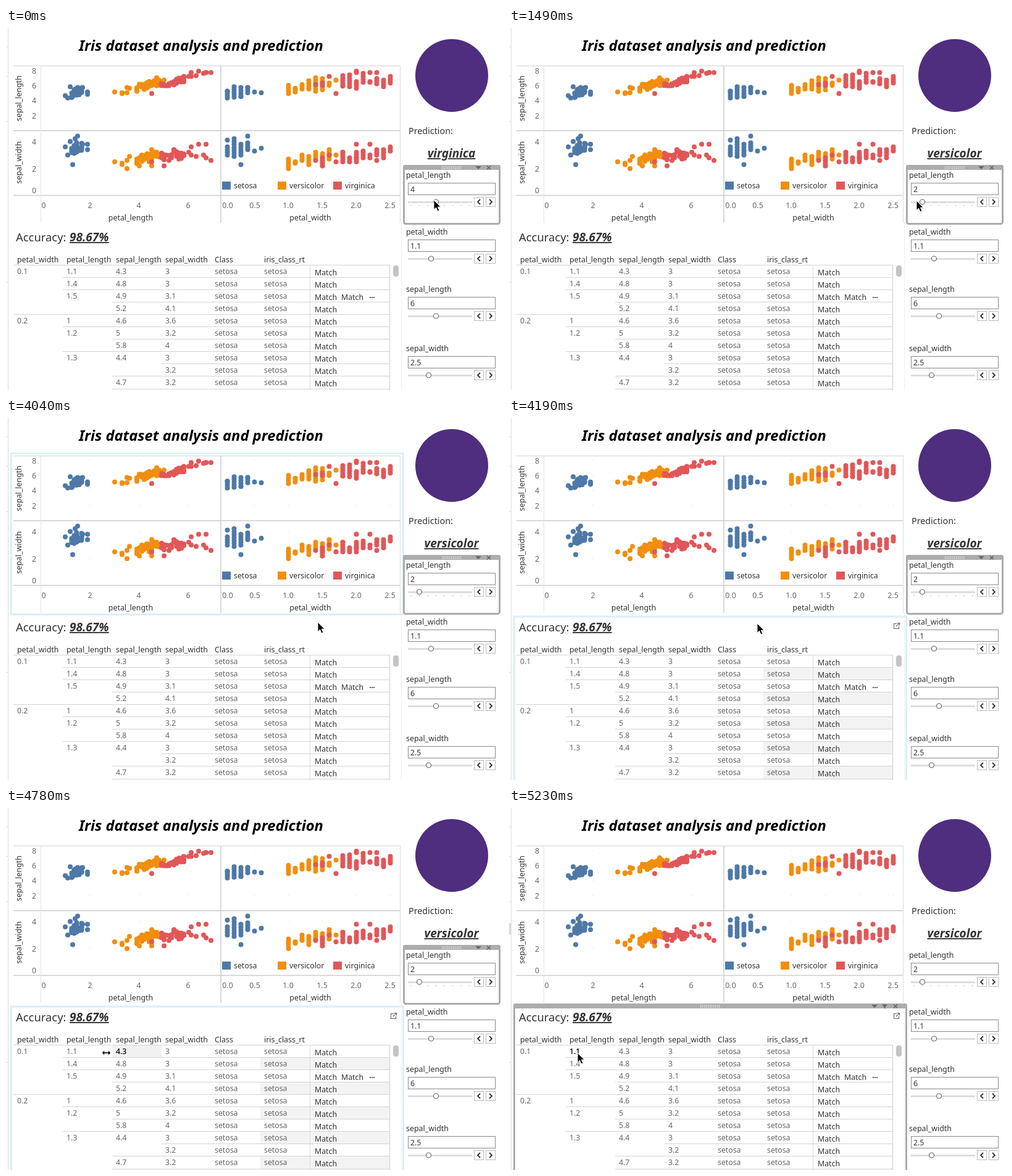
Recreate the animation shown at these times as an HTML page. Size 805 px wide and 587 px high, loop 8000 ms.

```html
<!DOCTYPE html>
<html lang="en">
<head>
<meta charset="utf-8">
<title>Flower dashboard</title>
<style>
html, body { margin: 0; width: 100%; height: 100%; overflow: hidden; background: #fff; }
svg { display: block; width: 805px; height: 587px; font: 12.3px "Noto Sans", sans-serif; }
text { fill: #666; }
.label { font-size: 12.4px; font-weight: 500; fill: #333; }
.dark { fill: #333; }
.black { fill: #000; }
.mid { text-anchor: middle; }
.big { font-size: 18.4px; fill: #333; }
.result { font-size: 19px; font-weight: 600; font-style: italic; fill: #333; text-decoration: underline; }
.title { font-size: 23.7px; font-weight: 700; font-style: italic; fill: #000; }
</style>
</head>
<body>
<svg id="stage" viewBox="0 0 805 587"></svg>
<script>
const LOOP = 8000;
const stage = document.getElementById('stage');

const text = (x, y, str, cls = '', extra = '') => `<text x="${x}" y="${y}" class="${cls}" ${extra}>${str}</text>`;
const rect = (x, y, w, h, fill, extra = '') => `<rect x="${x}" y="${y}" width="${w}" height="${h}" fill="${fill}" ${extra}/>`;
const path = (d, stroke, width = 1, fill = 'none') => `<path d="${d}" stroke="${stroke}" stroke-width="${width}" fill="${fill}"/>`;
const hline = (x1, x2, y, color = '#d4d4d4', width = 1) => path(`M${x1} ${y}H${x2}`, color, width);
const vline = (x, y1, y2, color = '#d4d4d4', width = 1) => path(`M${x} ${y1}V${y2}`, color, width);
const dot = (x, y, fill, r = 4) => `<circle cx="${x.toFixed(1)}" cy="${y.toFixed(1)}" r="${r}" fill="${fill}"/>`;
const group = (id, content) => `<g id="${id}">${content}</g>`;

// Scales of the scatter plots
const petalLengthX = v => 56 + 40 * v;
const petalWidthX = v => 347.5 + 110 * v;
const sepalLengthY = v => 165.5 - 12.1 * v;
const sepalWidthY = v => 272 - 22 * v;

let seed = 7;
const random = () => (seed = (seed * 16807) % 2147483647) / 2147483647;
const spread = range => (random() + random() - 1) * range;

// Cloud: petal length centre and range, then centre, slope and range of both sepal sizes
const species = [
  { name: 'setosa', color: '#4e79a7', legendX: 350, count: 34,
    cloud: { at: 1.46, range: .32, length: [5, .4, .6], width: [3.42, .2, .5] } },
  { name: 'versicolor', color: '#f28e0e', legendX: 440, count: 36,
    cloud: { at: 4.4, range: .6, length: [6.05, .8, .5], width: [2.85, .35, .35] } },
  { name: 'virginica', color: '#e15759', legendX: 530, count: 34,
    cloud: { at: 5.4, range: .65, length: [6.45, .8, .5], width: [3, .15, .45] } },
];

// Outlying flowers: petal length, sepal length, sepal width
const outliers = [
  [[1, 4.6, 3.6], [1.1, 4.3, 3], [1.2, 5.8, 4], [1.3, 4.5, 2.3], [1.5, 5.7, 4.4], [1.4, 5.5, 4.2],
   [1.9, 4.8, 3.4], [1.9, 5.1, 3.8], [1.7, 5.7, 3.8]],
  [[3, 5.1, 2.5], [3.3, 4.9, 2.4], [3.3, 5, 2.3], [3.5, 5, 2], [3.5, 5.7, 2.6], [3.6, 5.6, 2.9],
   [3.9, 5.2, 2.7], [4, 6, 2.2], [4.5, 6.2, 2.2], [4.5, 6, 3.4], [4.7, 7, 3.2], [5, 6.7, 3]],
  [[4.5, 4.9, 2.5], [5, 6, 2.2], [5.4, 6.2, 3.4], [5.8, 7.2, 3], [6, 7.2, 3.2], [6.1, 7.2, 3.6],
   [6.1, 7.7, 3], [6.3, 7.3, 2.9], [6.4, 7.9, 3.8], [6.6, 7.6, 3], [6.7, 7.7, 3.8], [6.7, 7.7, 2.8], [6.9, 7.7, 2.6]],
];

// Columns 0.1 apart in petal width: lowest and highest sepal length, then sepal width
const columns = [
  { start: .1, ranges: [[4.3, 5.2, 3, 3.6], [4.4, 5.8, 2.9, 4.2], [4.5, 5.7, 3, 3.8], [5, 5.7, 3.4, 3.9],
    [5.1, 5.1, 3.3, 3.3], [5, 5, 3.5, 3.5]] },
  { start: 1, ranges: [[4.9, 6, 2, 2.7], [5.1, 5.6, 2.4, 2.5], [5.5, 6.1, 2.6, 3], [5.5, 6.6, 2.3, 2.9],
    [5.2, 7, 2.7, 3.2], [5.4, 6.9, 2.2, 3.1], [6, 6.3, 2.7, 3.4], [6.7, 6.7, 3, 3], [5.9, 5.9, 3.2, 3.2]] },
  { start: 1.4, ranges: [[6.1, 6.1, 2.6, 2.6], [6, 6.3, 2.2, 2.8], [7.2, 7.2, 3, 3], [4.9, 4.9, 2.5, 2.5],
    [5.9, 7.3, 2.5, 3.2], [5.8, 7.4, 2.5, 2.8], [5.6, 6.5, 2.5, 3.2], [6.4, 7.6, 2.8, 3.3],
    [6.4, 6.5, 2.8, 3], [6.2, 6.9, 3, 3.4], [5.8, 6.7, 2.8, 3.4], [6.3, 7.2, 3.3, 3.6]] },
];
const columnExtras = [
  [[.1, 5.2, 4.1], [.3, 4.5, 2.3], [.4, 5.7, 4.4]],
  [],
  [[2, 7.9, 3.8], [2, 7.7, 2.8], [2.2, 7.7, 3.8], [2.3, 7.7, 2.6]],
];

function fillRange(low, high, step) {
  const n = Math.ceil((high - low) / step - 1e-6);
  return Array.from({ length: n + 1 }, (_, i) => n ? low + (high - low) * i / n : low);
}

function scatter() {
  return species.map(({ color, cloud, count }, s) => {
    const pair = (x, length, width) => dot(x, sepalLengthY(length), color) + dot(x, sepalWidthY(width), color);
    let out = '';
    for (let i = 0; i < count; i++) {
      const offset = Math.round(spread(cloud.range) * 10) / 10;
      const size = ([centre, slope, range]) => centre + slope * offset + spread(range);
      out += pair(petalLengthX(cloud.at + offset), size(cloud.length), size(cloud.width));
    }
    for (const [x, length, width] of outliers[s]) out += pair(petalLengthX(x), length, width);
    columns[s].ranges.forEach(([l0, l1, w0, w1], i) => {
      const x = petalWidthX(columns[s].start + i / 10);
      for (const v of fillRange(l0, l1, .4)) out += dot(x, sepalLengthY(v), color);
      for (const v of fillRange(w0, w1, .22)) out += dot(x, sepalWidthY(v), color);
    });
    for (const [x, length, width] of columnExtras[s]) out += pair(petalWidthX(x), length, width);
    return out;
  }).join('');
}

function plots() {
  let out = hline(12, 639, 61.5) + hline(12, 639, 166.5, '#ccc', 1.5) + hline(12, 639, 271.5, '#ccc', 1.5)
    + vline(56.5, 62, 316, '#e4e4e4') + vline(348, 62, 316, '#ccc', 1.5) + vline(638.5, 62, 316, '#ddd');
  [[8, 74], [6, 98], [4, 122], [2, 147], [4, 189], [2, 233], [0, 268]].forEach(([v, y]) => out += text(42, y, v));
  [[0, 61], [2, 136], [4, 215], [6, 295], ['0.0', 359], ['0.5', 403], ['1.0', 457], ['1.5', 512], ['2.0', 567], ['2.5', 622]]
    .forEach(([v, x]) => out += text(x, 292, v, 'mid'));
  out += text(202, 312, 'petal_length', 'label mid') + text(493, 312, 'petal_width', 'label mid');
  for (const [name, y] of [['sepal_length', 114], ['sepal_width', 218]])
    out += text(0, 0, name, 'label mid', `transform="translate(25 ${y}) rotate(-90)"`);

  let grid = '';
  for (const x of [2, 4, 6].map(petalLengthX).concat([.5, 1, 1.5, 2, 2.5].map(petalWidthX)))
    for (const y of [8, 6, 4, 2].map(sepalLengthY).concat([4, 2].map(sepalWidthY))) grid += dot(x, y, '#eee', 1);
  out += group('grid', grid) + scatter();
  for (const { name, color, legendX } of species)
    out += rect(legendX, 249, 14, 13, color) + text(legendX + 19, 260, name, 'dark');
  return out;
}

const tableHead = ['petal_width', 'petal_length', 'sepal_length', 'sepal_width', 'Class', 'iris_class_rt'];
// Each row: leading cells, then the column where its lower rule begins
const tableRows = [
  ['0.1', '1.1', '4.3', '3', 1], ['', '1.4', '4.8', '3', 1], ['', '1.5', '4.9', '3.1', 2], ['', '', '5.2', '4.1', 0],
  ['0.2', '1', '4.6', '3.6', 1], ['', '1.2', '5', '3.2', 2], ['', '', '5.8', '4', 1], ['', '1.3', '4.4', '3', 3],
  ['', '', '', '3.2', 2], ['', '', '4.7', '3.2', 2],
];

function table() {
  const rowY = i => 384.5 + 20.05 * i;
  let bands = '';
  for (let i = 1; i < 10; i += 2) bands += rect(412, rowY(i), 210, 20, '#f3f3f3');
  let out = group('bands', bands) + group('cellShade', rect(172, 385, 80, 19, '#f1f1f1'));

  out += text(16, 346, 'Accuracy:', 'big') + text(103, 346, '98.67%', 'result');
  tableHead.forEach((name, i) => out += text(18 + 80 * i, 380, name, 'label'));
  out += hline(12, 622, 384.5) + vline(492.5, 384, 587, '#ddd') + vline(621.5, 384, 587, '#ccc');
  tableRows.forEach((row, i) => {
    const y = Math.round(rowY(i) + 14.5);
    const cells = [...row.slice(0, 4), 'setosa', 'setosa'];
    cells.forEach((cell, c) => { if (cell) out += text(18 + 80 * c, y, cell); });
    out += text(500, y + 2, 'Match', 'dark') + hline(12 + 80 * row[4], 622, Math.floor(rowY(i + 1)) + .5);
  });
  out += text(543, 441, 'Match', 'dark');
  for (const x of [590, 593, 596]) out += dot(x, 437, '#333', 1.1);
  return out + rect(627, 385, 9, 18, '#c4c4c4', 'rx="4"')
    + group('headHover', text(178, 380, 'sepal_length', 'label black'))
    + group('longHover', text(178, 399, '4.3', 'black'))
    + group('shortHover', text(98, 399, '1.1', 'black'));
}

const knob = (id, x, y) => `<circle id="${id}" cx="${x}" cy="${y}" r="4" fill="#fff" stroke="#666" stroke-width="1.2"/>`;

function controls() {
  const items = [['petal_length', '4', 696.5, 0], ['petal_width', '1.1', 688.5, 92], ['sepal_length', '6', 696.5, 185], ['sepal_width', '2.5', 684.5, 281]];
  return items.map(([name, value, x, dy], i) => {
    let out = text(648, 243 + dy, name, 'label') + rect(651.5, 251.5 + dy, 141, 19, '#fff', 'stroke="#8a8a8a"')
      + text(655, 266 + dy, value, 'dark', `id="value${i}"`) + hline(651, 755, 282.5 + dy, '#ddd', 3);
    if (!i) for (let n = 0; n < 8; n++) out += vline(656 + 13.5 * n, 287, 289, '#bbb');
    for (const [bx, dir] of [[758.5, -1], [777.5, 1]]) {
      const cx = bx + 7.5;
      out += rect(bx, 274.5 + dy, 15, 15, '#fff', 'stroke="#bbb"')
        + path(`M${cx - 2 * dir} ${278 + dy}l${4 * dir} 4l${-4 * dir} 4`, '#333', 1.8);
    }
    return out + knob('knob' + i, x, 282 + dy);
  }).join('');
}

function windowFrame(id, x, y, w, h, icons) {
  let out = rect(x + 1.5, y + 1.5, w - 3, h - 3, 'none', 'stroke="#acacac" stroke-width="3" rx="3"')
    + rect(x, y, w, 8, '#acacac', 'rx="3"');
  const mid = x + w / 2;
  for (let i = -16; i <= 16; i += 3)
    for (const dy of [2.5, 5]) out += rect(mid + i, y + dy, 1.3, 1.3, '#fff');
  const close = x + w - 19, cy = y + 4.5;
  out += path(`M${close - 3} ${cy - 3}l6 6m0 -6l-6 6`, '#666', 1.5);
  out += path(`M${close - icons * 17 - 5} ${cy - 2.5}h10l-5 5z`, 'none', 0, '#666');
  if (icons > 1) out += path(`M${close - 22} ${cy - 3}h9l-3.5 4v3l-2 -1v-2z`, 'none', 0, '#666');
  return group(id, out);
}

const hoverFrame = (id, y, h) => group(id, rect(8.5, y, 635, h, 'none', 'stroke="#dceff7" stroke-width="3"'));

stage.innerHTML = rect(0, 0, 805, 587, '#fff')
  + vline(3.5, 0, 587, '#ddd') + [30.5, 78.5, 151.5, 412.5].map(y => hline(0, 4, y, '#ddd')).join('')
  + group('edgeBlock', rect(0, 187, 4, 19, '#ddd'))
  + vline(640.5, 316, 587, '#eee')
  + text(118, 37, 'Iris dataset analysis and prediction', 'title')
  + dot(722, 77, '#4f2d7f', 59)
  + text(652, 172, 'Prediction:', 'dark', 'style="font-size:14.3px"')
  + text(721.5, 210, '', 'result mid', 'id="prediction"')
  + plots() + table() + controls()
  + hoverFrame('plotHover', 57.5, 261) + hoverFrame('tableHover', 322, 300)
  + windowFrame('controlFrame', 643, 222, 158, 97, 1) + windowFrame('tableFrame', 7, 317, 638, 300, 2)
  + group('popOut', path('M628 333.5h-4.5v8h8v-4M627 338l5 -5m-3.5 -.5h4v4', '#666', 1.1))
  + group('arrow', path('M0 0V15.5L3.6 12.2L6 18L8.8 16.8L6.4 11.2H11Z', '#fff', 1, '#000'))
  + group('resize', path('M-7 0L-3 -4.5V-1.2H3V-4.5L7 0L3 4.5V1.2H-3V4.5Z', '#fff', .8, '#000'));

const pointer = [
  [0, 693, 279], [1350, 687, 279], [1490, 660, 280], [3890, 618, 281], [4040, 505, 331], [4190, 402, 333],
  [4490, 235, 371], [4630, 205, 380], [4780, 162.5, 397], [4930, 123, 403], [5080, 111, 397],
];
// Visible spans of the changing parts
const spans = {
  controlFrame: [0, 5230], grid: [4040, LOOP], plotHover: [4040, 4190], tableHover: [4190, 5230],
  bands: [4190, 5230], popOut: [4190, LOOP], headHover: [4630, 4780], cellShade: [4780, 5230],
  longHover: [4780, 4930], shortHover: [4930, LOOP], resize: [4780, 5080],
  tableFrame: [5230, LOOP], edgeBlock: [5230, LOOP],
};
const el = id => document.getElementById(id);
const show = (id, on) => el(id).setAttribute('visibility', on ? 'visible' : 'hidden');

function render(t) {
  for (const [id, [from, to]] of Object.entries(spans)) show(id, t >= from && t < to);
  show('arrow', t < 4780 || t >= 5080);
  const [, x, y] = pointer.findLast(step => t >= step[0]);
  for (const id of ['arrow', 'resize']) el(id).setAttribute('transform', `translate(${x} ${y})`);
  el('prediction').textContent = t < 750 ? 'virginica' : 'versicolor';
  el('value0').textContent = t < 1490 ? '4' : '2';
  el('knob0').setAttribute('cx', t < 1490 ? 696.5 : 669.5);
}

const began = performance.now();
function tick() {
  render((performance.now() - began) % LOOP);
  requestAnimationFrame(tick);
}
tick();
</script>
</body>
</html>
```
